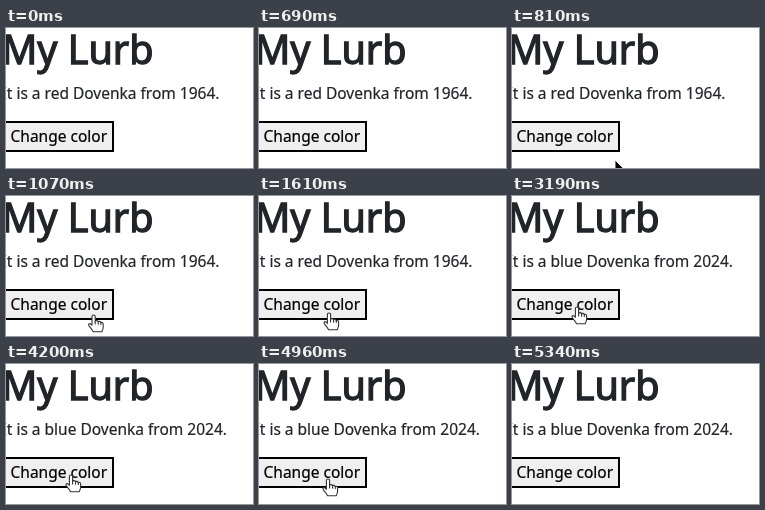
These frames come from a looping animation (247 by 140 pixels, 5.58 s). An HTML page:

```html
<!DOCTYPE html>
<html lang="en">
<head>
<meta charset="utf-8">
<title>Change color</title>
<style>
  html, body { margin: 0; width: 100%; height: 100%; overflow: hidden; background: #fff; }
  svg { display: block; width: 247px; height: 140px; }
  text {
    font: 15.5px "Noto Sans", "Open Sans", sans-serif;
    fill: #212529; stroke: #212529; stroke-width: .2px;
  }
  .title { font-size: 39.5px; stroke-width: 1.3px; }
  .label { fill: #000; stroke: #000; }
</style>
</head>
<body>
<svg viewBox="0 0 247 140">
  <text class="title" x="-4.5" y="36">My Lurb</text>
  <text id="info" x="-4.5" y="71"></text>
  <rect x="-2" y="94" width="109" height="29" fill="#efefef" stroke="#000" stroke-width="2"/>
  <text class="label" x="4.5" y="114">Change color</text>
  <g id="arrow">
    <path d="M0 0V16.5L4 12.8L6.6 18.6L9.4 17.4L6.8 11.8H12Z"
          fill="#000" stroke="#fff" stroke-width="1"/>
  </g>
  <g id="hand" stroke="#333" stroke-width="1.1" stroke-linejoin="round" stroke-linecap="round">
    <path fill="#fff" d="M-1.6 10.3V1.5Q-1.6 0 0 0T1.6 1.5V6Q3.6 5 4.6 6.6Q6.5 5.8 7.3 7.5
      Q9.6 7 9.6 9.2V12.2Q9.6 14 8.2 16.8H-.4Q-1.6 14.6-4.4 11.2Q-5.6 9.4-4.4 8.7Q-3.2 8.2-1.6 10.3Z"/>
    <path fill="none" d="M1.6 6V9M4.6 6.6V9.2M7.3 7.5V9.6"/>
  </g>
</svg>
<script>
const LOOP = 5580, CLICK = 3090;
const $ = id => document.getElementById(id);
const info = $("info"), arrow = $("arrow"), hand = $("hand");

const sweeps = [
  { start: 670, end: 1200, steps: 11, path: [[104, 140], [104, 115], [73, 119]] },
  { start: 4960, end: 5340, steps: 12, path: [[69, 115], [76, 122], [96, 142]] }
];
// time, x, y: the pointer rests at each stop until the next
const stops = [
  [1200, 73, 119], [1380, 71, 118], [1610, 70, 117], [1715, 69, 116],
  [1820, 68, 115], [2010, 67, 113], [2400, 65, 111], [4540, 67, 113], [4640, 69, 115]
];

function bezier([a, b, c], u) {
  const v = 1 - u;
  return [0, 1].map(i => v * v * a[i] + 2 * u * v * b[i] + u * u * c[i]);
}

function pointer(t) {
  if (t < sweeps[0].start || t >= sweeps[1].end) return null;
  const s = sweeps.find(s => t >= s.start && t < s.end);
  if (s) {
    const u = Math.floor((t - s.start) / (s.end - s.start) * s.steps) / s.steps;
    return bezier(s.path, u);
  }
  return stops.filter(p => p[0] <= t).pop().slice(1);
}

function place(el, pos) {
  el.style.display = pos ? "" : "none";
  if (pos) el.setAttribute("transform", `translate(${pos[0]} ${pos[1]})`);
}

function draw() {
  const t = performance.now() % LOOP;
  const pos = pointer(t);
  const over = pos && pos[0] < 108 && pos[1] < 124;
  place(arrow, over ? null : pos);
  place(hand, over ? pos : null);
  const [color, year] = t < CLICK ? ["red", 1964] : ["blue", 2024];
  info.textContent = `It is a ${color} Dovenka from ${year}.`;
  requestAnimationFrame(draw);
}
draw();
</script>
</body>
</html>
```
